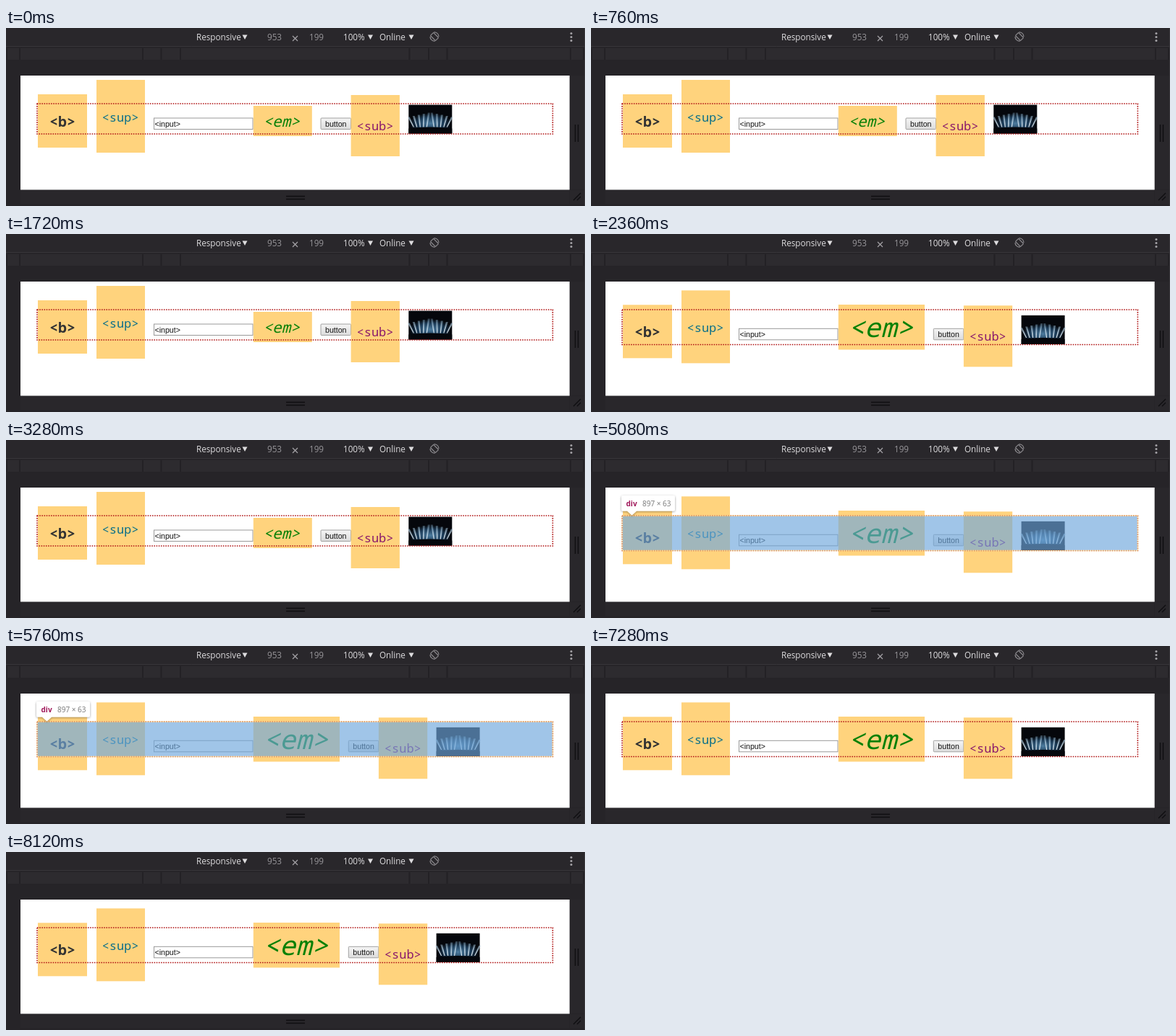
An HTML page that plays this animation: 800x247 px, repeating every 8160 ms.

```html
<!DOCTYPE html>
<html lang="en">
<head>
<meta charset="utf-8">
<title>Inline boxes and line height</title>
<style>
  html, body { margin: 0; width: 100%; height: 100%; overflow: hidden; background: #262428; }
  svg { display: block; width: 800px; height: 247px; }
  .bar { font: 11.7px "Open Sans", "Noto Sans", sans-serif; fill: #dddcde; }
  .bar .dim { fill: #98969a; }
  .tag { font-family: "Noto Sans Mono", "DejaVu Sans Mono", monospace; font-size: 20.8px; }
  .bold { font-size: 20px; font-weight: 700; }
  .small { font-size: 17px; }
  .box { fill: #ffd37d; }
  .form { font: 10.6px "Liberation Sans", Arial, sans-serif; fill: #111; }
  .tip { font: 10px "Open Sans", "Noto Sans", sans-serif; fill: #777; }
</style>
</head>
<body>
<svg viewBox="0 0 800 247">
  <defs>
    <linearGradient id="face" x2="0" y2="1">
      <stop stop-color="#f5f5f5"/><stop offset="1" stop-color="#dcdcdc"/>
    </linearGradient>
    <radialGradient id="glow" cy=".65" r=".55">
      <stop stop-color="#4d7c9f"/><stop offset=".6" stop-color="#1d3c58"/><stop offset="1" stop-color="#05070c"/>
    </radialGradient>
    <linearGradient id="ray" gradientUnits="userSpaceOnUse" x1="0" y1="0" x2="0" y2="-21">
      <stop stop-color="#f2faff"/><stop offset="1" stop-color="#8dbcdc" stop-opacity=".25"/>
    </linearGradient>
    <filter id="shadow" x="-20%" y="-30%" width="140%" height="170%">
      <feDropShadow dx="0" dy="1" stdDeviation="1.5" flood-opacity=".4"/>
    </filter>
  </defs>

  <!-- device toolbar -->
  <rect width="800" height="247" fill="#262428"/>
  <rect width="800" height="25" fill="#29272b"/>
  <path d="M0 25.500H800" stroke="#38363a"/>
  <rect y="28" width="800" height="16" fill="#2d2b2f"/>
  <path d="M1 28V44M19 28V44M189 28V44M214.500 28V44M241 28V44M557.500 28V44M584 28V44M609.500 28V44M780 28V44M798 28V44"
        stroke="#232125" stroke-width="2"/>
  <g class="bar">
    <text x="263" y="16.800">Responsive</text>
    <text class="dim" x="361" y="16.800">953</text>
    <text class="dim" x="419" y="16.800">199</text>
    <text x="466" y="16.800">100%</text>
    <text x="516" y="16.800">Online</text>
    <path d="M326.500 9.500h7l-3.500 6.500zM500 9.500h7l-3.500 6.500zM556.500 9.500h7l-3.500 6.500z"/>
    <g fill="#a5a3a7"><circle cx="781" cy="7.500" r="1.500"/><circle cx="781" cy="12.500" r="1.500"/><circle cx="781" cy="17.500" r="1.500"/></g>
  </g>
  <path d="M396 11l7 7m0-7l-7 7" stroke="#a5a3a7" stroke-width="1.2"/>
  <g fill="none" stroke="#8d8b8f" stroke-width="1.2">
    <rect x="-3" y="-5" width="6" height="10" rx="1" transform="translate(592 12) rotate(-45)"/>
    <path d="M591 6a6 6 0 0 1 7 6M593 18a6 6 0 0 1-7-6"/>
  </g>

  <!-- page and resize handles -->
  <path d="M779 66h20v158h-20zM20 225h758v19H20zM779 225h20v19h-20z" fill="#29272b"/>
  <path d="M799.500 0V247" stroke="#38363a"/>
  <path d="M387 233.500h26M387 237.500h26M786.500 134v24M790.500 134v24M784 239l10-10M789 239l5-5"
        stroke="#0f0e10" stroke-width="1.4"/>
  <rect x="20" y="66" width="758.700" height="158.500" fill="#fff"/>

  <g id="row">
    <rect class="box" x="44" y="92" width="68" height="74"/>
    <text class="tag bold" x="60" y="137" fill="#333">&lt;b&gt;</text>
    <rect class="box" x="125" y="72" width="67" height="101"/>
    <text class="tag small" x="132.500" y="129.600" fill="#0b7089">&lt;sup&gt;</text>
    <rect x="204.500" y="125" width="136.500" height="15.500" fill="#fff" stroke="#999"/>
    <text class="form" x="205.500" y="136.600">&lt;input&gt;</text>
    <rect class="box" id="emBox" x="341.800"/>
    <text class="tag" id="em" x="355.500" y="136.600" font-style="italic" fill="#078007">&lt;em&gt;</text>

    <g id="tail">
      <rect x="435" y="125" width="41.500" height="15.500" rx="1" fill="url(#face)" stroke="#a0a0a0"/>
      <text class="form" x="455.800" y="136.600" text-anchor="middle">button</text>
      <rect class="box" x="476.600" y="93" width="67.300" height="85"/>
      <text class="tag small" x="484.500" y="141.800" fill="#8b1a6b">&lt;sub&gt;</text>
      <g transform="translate(556.300 106.600)">
        <rect width="60" height="40" fill="#05070c"/>
        <rect x="3" y="9" width="54" height="26" fill="url(#glow)"/>
        <g id="rays" transform="translate(0 31)" fill="url(#ray)"></g>
        <path d="M0 40v-7q30-4 60 0v7z" fill="#05070c"/>
      </g>
    </g>
  </g>
  <rect id="frame" x="43" y="105" width="712.400" fill="none" stroke="#b01414" stroke-width="1.6" stroke-dasharray="1.59"/>

  <!-- inspector highlight -->
  <g id="inspect">
    <rect x="43" y="105" width="712.400" height="48.500" fill="none" stroke="#ffe599" stroke-opacity=".66" stroke-width="1.6"/>
    <rect x="43.800" y="105.800" width="710.800" height="46.900" fill="#6fa8dc" fill-opacity=".66"/>
    <path d="M44 77h70q2 0 2 2v17.500q0 2-2 2H63l-6.500 6-6.500-6H44q-2 0-2-2V79q0-2 2-2z" fill="#fff" filter="url(#shadow)"/>
    <text class="tip" x="48.500" y="91.500"><tspan font-weight="700" fill="#a0185a">div</tspan><tspan x="71">897 × 63</tspan></text>
  </g>
</svg>
<script>
const LOOP = 8160;
const $ = id => document.getElementById(id);
const set = (id, attrs) => {
  for (const name in attrs) $(id).setAttribute(name, attrs[name]);
};
const within = (t, from, to) => t >= from && t < to;

// two clusters of stage lights leaning away from the middle
$("rays").innerHTML = Array.from({ length: 10 }, (_, i) => {
  const side = i < 5 ? -1 : 1, n = i % 5;
  const x = 30 + side * (5 + n * 4.5), lean = side * (n * 2.5 - 3);
  return `<path d="M${x - 0.5} 0h1l${lean + 1} ${n * 1.5 - 20}h-3z"/>`;
}).join("");

function draw(now) {
  const t = now % LOOP;
  const big = within(t, 2000, 3200) || t >= 4600;
  set("row", { transform: `translate(0 ${big ? 6.3 : 0})` });
  set("tail", { transform: `translate(${big ? 38.3 : 0} 0)` });
  set("emBox", big ? { y: 91.7, width: 119.2, height: 62.5 } : { y: 108, width: 81, height: 42 });
  $("em").style.fontSize = big ? "37.2px" : "21px";
  set("frame", { height: big ? 48.5 : 42 });
  set("inspect", { visibility: within(t, 5080, 7200) ? "visible" : "hidden" });
  requestAnimationFrame(draw);
}
draw(0);
</script>
</body>
</html>
```
